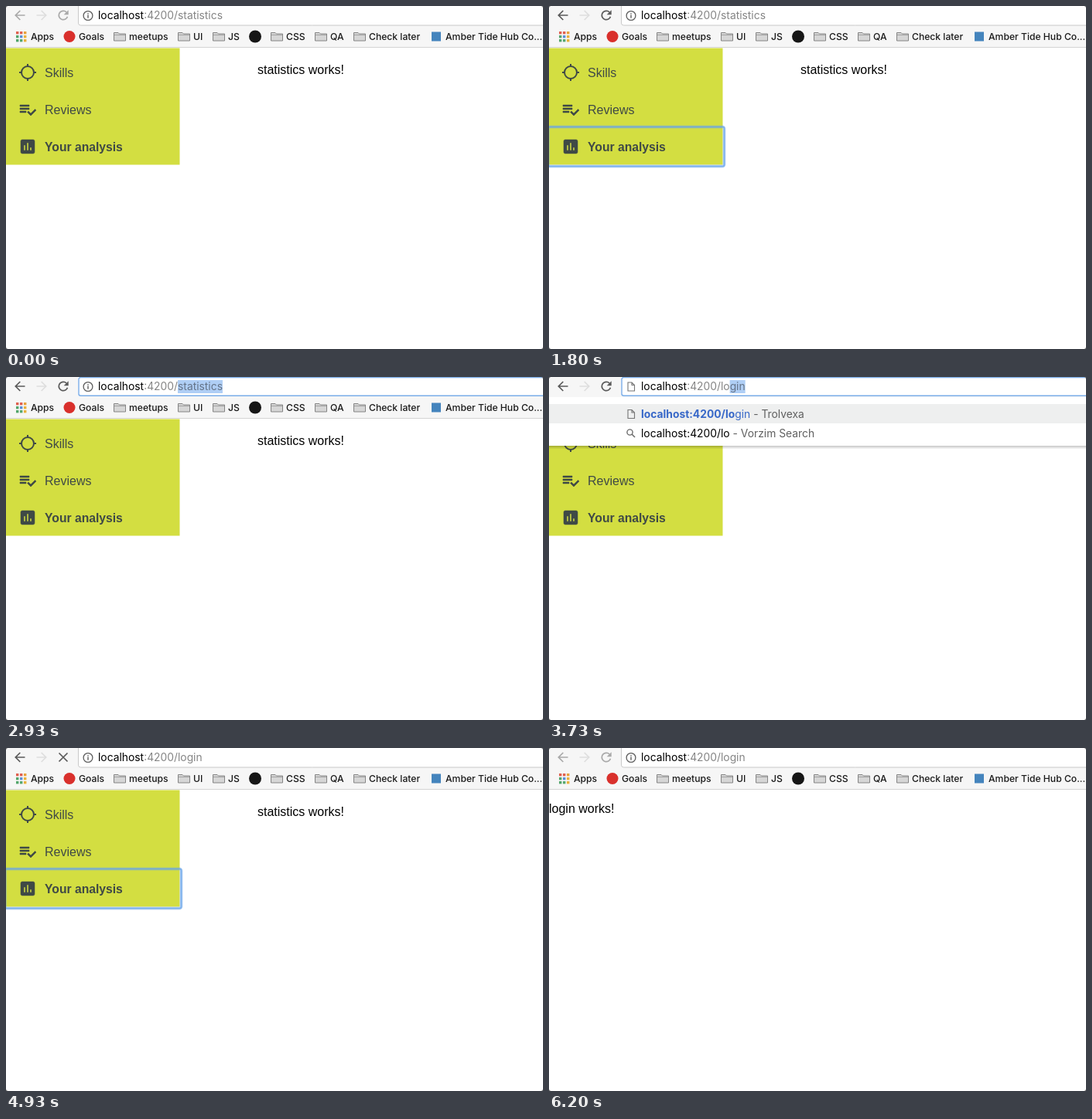
These frames come from a looping animation (694x444 px, 6270 ms). An HTML page with a canvas:

```html
<!DOCTYPE html>
<html lang="en">
<head>
<meta charset="utf-8">
<title>Route guard demo</title>
<style>
  html, body { margin: 0; width: 100%; height: 100%; overflow: hidden; background: #fff; }
  canvas { display: block; width: 694px; height: 444px; }
</style>
</head>
<body>
<canvas id="stage"></canvas>
<script>
const W = 694, H = 444, LOOP = 6270;
const UI = 'Inter, sans-serif', PAGE = '"Liberation Sans", Arial, sans-serif';
const URL_FONT = `13.85px ${UI}`, URL_BOLD = `700 13.85px ${UI}`, MARK_FONT = `500 12.15px ${UI}`;
const HOST = 'localhost', PORT = ':4200/';
const INK = '#3f4946', LIME = '#d3de41', GREY = '#858585';

// Moments of the recorded session, in ms.
const AT = { active: 870, ring: 1470, select: 2800, enter: 4530, loaded: 5070, idle: 6000 };
const KEYS = [[3470, 'l'], [3600, 'lo'], [4000, 'log'], [4130, 'logi'], [4270, 'login']];

const canvas = document.getElementById('stage');
const ctx = canvas.getContext('2d');
const ratio = window.devicePixelRatio || 1;
canvas.width = W * ratio;
canvas.height = H * ratio;

const CHECKLIST = new Path2D('M14 10H2v2h12v-2zm0-4H2v2h12V6zM2 16h8v-2H2v2zm19.5-4.5L23 13l-6.99 7-4.51-4.5L13 14l3.01 3 5.49-5.5z');
const CHART = new Path2D('M19 3H5c-1.1 0-2 .9-2 2v14c0 1.1.9 2 2 2h14c1.1 0 2-.9 2-2V5c0-1.1-.9-2-2-2zM9 17H7v-7h2v7zm4 0h-2V7h2v10zm4 0h-2v-4h2v4z');

function rect(x, y, w, h, color) {
  ctx.fillStyle = color;
  ctx.fillRect(x, y, w, h);
}

function rounded(x, y, w, h, r, color, width) {
  ctx.beginPath();
  ctx.roundRect(x, y, w, h, r);
  if (width) {
    ctx.strokeStyle = color;
    ctx.lineWidth = width;
    ctx.stroke();
  } else {
    ctx.fillStyle = color;
    ctx.fill();
  }
}

function disc(x, y, r, color) {
  ctx.beginPath();
  ctx.arc(x, y, r, 0, 7);
  ctx.fillStyle = color;
  ctx.fill();
}

function ringShape(x, y, r, color, width, from = 0, to = 2 * Math.PI) {
  ctx.beginPath();
  ctx.arc(x, y, r, from, to);
  ctx.strokeStyle = color;
  ctx.lineWidth = width;
  ctx.stroke();
}

function lines(color, width, ...paths) {
  ctx.beginPath();
  for (const path of paths) {
    for (let i = 0; i < path.length; i += 2) {
      ctx[i ? 'lineTo' : 'moveTo'](path[i], path[i + 1]);
    }
  }
  ctx.strokeStyle = color;
  ctx.lineWidth = width;
  ctx.stroke();
}

function icon(path, x, y) {
  ctx.save();
  ctx.translate(x, y);
  ctx.fillStyle = ctx.strokeStyle = INK;
  ctx.lineWidth = 0.5;
  ctx.fill(path);
  ctx.stroke(path);
  ctx.restore();
}

// Draws text and returns the x where it ends.
function text(str, x, y, font, color) {
  ctx.font = font;
  ctx.fillStyle = color;
  ctx.fillText(str, x, y);
  return x + ctx.measureText(str).width;
}

function documentIcon(x, y) {
  lines('#757575', 1.1, [x - 4, y - 5.5, x + 1, y - 5.5, x + 4.5, y - 2, x + 4.5, y + 5.5, x - 4, y + 5.5, x - 4, y - 6],
    [x + 1, y - 5.5, x + 1, y - 2, x + 4.5, y - 2]);
}

function infoIcon(x, y) {
  ringShape(x, y, 5.9, '#5c5c5c', 1.3);
  rect(x - 0.7, y - 1, 1.4, 4.2, '#5c5c5c');
  rect(x - 0.7, y - 3.3, 1.4, 1.4, '#5c5c5c');
}

function arrow(x, y, dir, color) {
  lines(color, 1.7, [x - 6 * dir, y, x + 6.5 * dir, y],
    [x + 0.3 * dir, y - 6, x - 5.7 * dir, y, x + 0.3 * dir, y + 6]);
}

function reloadIcon(x, y, color) {
  ringShape(x, y, 5.7, color, 1.7, 0.3, 5.5);
  ctx.beginPath();
  ctx.moveTo(x + 6.7, y - 6.8);
  ctx.lineTo(x + 6.7, y - 0.8);
  ctx.lineTo(x + 0.7, y - 0.8);
  ctx.fillStyle = color;
  ctx.fill();
}

function folder(x) {
  ctx.beginPath();
  ctx.moveTo(x + 0.5, 45);
  ctx.lineTo(x + 0.5, 34.5);
  ctx.lineTo(x + 6, 34.5);
  ctx.lineTo(x + 7.5, 36);
  ctx.lineTo(x + 15.5, 36);
  ctx.lineTo(x + 15.5, 45);
  ctx.closePath();
  ctx.fillStyle = '#d6d6d6';
  ctx.fill();
  ctx.strokeStyle = '#858585';
  ctx.lineWidth = 1;
  ctx.stroke();
  lines('#a0a0a0', 1, [x + 1, 37.5, x + 15, 37.5]);
}

function drawPage(state) {
  if (state.loggedOut) {
    text('login works!', 0, 84, `16px ${PAGE}`, '#000');
    return;
  }
  rect(0, 54.5, 224.5, 151, LIME);
  ringShape(28, 86, 8, INK, 2);
  lines(INK, 2, [28, 75, 28, 78], [28, 94, 28, 97], [17, 86, 20, 86], [36, 86, 39, 86]);
  icon(CHECKLIST, 16, 122);
  icon(CHART, 16, 170);
  text('Skills', 50, 92, `16px ${PAGE}`, INK);
  text('Reviews', 50, 140, `16px ${PAGE}`, INK);
  text('Your analysis', 50, 188, `bold 15.7px ${PAGE}`, INK);
  text('statistics works!', 325, 88, `16px ${PAGE}`, '#000');
  if (state.ring) {
    rounded(-1, 156.5, 227.5, 51, 2.5, 'rgba(110,168,236,.4)', 4);
    rounded(-1, 156.5, 227.5, 51, 2, 'rgba(100,162,232,.75)', 2);
  }
}

function drawBookmarks() {
  const dots = ['#e0604f', '#e0604f', '#e8a13c', '#52a56b', '#5a8fd6', '#e8b13c', '#52a56b', '#57a86f', '#e8b13c'];
  dots.forEach((color, i) => rect(13 + (i % 3) * 5, 33 + Math.floor(i / 3) * 5, 3.4, 3.4, color));
  disc(82, 39.5, 7.5, '#d9302c');
  disc(322, 39.5, 8, '#161616');
  rect(550, 33.5, 12, 12, '#4484bd');
  const labels = [['Apps', 32], ['Goals', 94], ['Amber Tide Hub Co...', 568]];
  const folders = [['meetups', 139], ['UI', 222], ['JS', 267], ['CSS', 342], ['QA', 399], ['Check later', 449]];
  for (const [label, x] of folders) {
    folder(x);
    labels.push([label, x + 20]);
  }
  for (const [label, x] of labels) text(label, x, 44, MARK_FONT, '#1a1a1a');
}

function drawAddress(state) {
  rounded(93.5, -4, 620, 29, 3, '#fff');
  if (state.focused) rounded(94, 0.5, 620, 23.8, 2.5, '#7aade8', 1.4);
  else rounded(93.5, -4, 620, 29, 3, '#c9c9c9', 1);

  if (state.typed) documentIcon(106, 12.5);
  else infoIcon(106, 12.5);

  ctx.font = URL_FONT;
  const kept = HOST + PORT + state.typed;
  const start = 119 + ctx.measureText(kept).width;
  const rest = state.path.slice(state.typed.length);
  if (state.focused && rest) rect(start, 4, ctx.measureText(rest).width, 17, '#afcef5');
  const x = text(HOST, 119, 17, URL_FONT, '#000');
  text(PORT + state.typed, x, 17, URL_FONT, GREY);
  text(rest, start, 17, URL_FONT, state.focused ? '#647388' : GREY);
}

function drawToolbar(state) {
  rect(0, 0, W, 53, '#f6f6f6');
  rect(0, 53, W, 1, '#d4d4d4');
  const color = state.active ? '#5a5a5a' : '#a9a9a9';
  arrow(18, 12, 1, color);
  arrow(46, 12, -1, '#dedede');
  if (state.loading) lines(color, 1.7, [68.5, 6.5, 79.5, 17.5], [79.5, 6.5, 68.5, 17.5]);
  else reloadIcon(74, 12, color);
  drawBookmarks();
  drawAddress(state);
}

function drawSuggestions(typed) {
  const query = HOST + PORT + typed, blue = '#3868c8';
  for (let i = 0; i < 4; i++) rect(0, 89 + i, W, 1, `rgba(0,0,0,${0.2 - i * 0.05})`);
  rect(0, 26, W, 63, '#fff');
  rect(0, 35, W, 25, '#eeefef');
  documentIcon(106, 48);
  let x = text(query, 119, 53, URL_BOLD, blue);
  x = text('login'.slice(typed.length), x, 53, URL_FONT, blue);
  text(' - Trolvexa', x, 53, URL_FONT, '#606060');
  ringShape(104.5, 71.5, 3.6, '#6b6b6b', 1.4);
  lines('#6b6b6b', 1.6, [107, 74, 111, 78]);
  x = text(query, 119, 78, URL_FONT, '#000');
  text(' - Vorzim Search', x, 78, URL_FONT, '#606060');
}

function drawCorners() {
  for (const x of [0, W]) {
    for (const y of [0, H]) {
      const dx = x ? -2 : 2, dy = y ? -2 : 2;
      ctx.beginPath();
      ctx.moveTo(x, y);
      ctx.lineTo(x + dx, y);
      ctx.lineTo(x, y + dy);
      ctx.fillStyle = '#777';
      ctx.fill();
    }
  }
}

function stateAt(t) {
  const focused = t >= AT.select && t < AT.enter;
  const key = KEYS.filter(([time]) => time <= t).pop();
  return {
    active: t >= AT.active && t < AT.idle,
    focused,
    ring: t >= AT.ring && !focused,
    typed: focused && key ? key[1] : '',
    path: key ? 'login' : 'statistics',
    loading: t >= AT.enter && t < AT.loaded,
    loggedOut: t >= AT.loaded
  };
}

function draw() {
  const state = stateAt(performance.now() % LOOP);
  ctx.setTransform(ratio, 0, 0, ratio, 0, 0);
  rect(0, 0, W, H, '#fff');
  drawPage(state);
  drawToolbar(state);
  if (state.typed) drawSuggestions(state.typed);
  drawCorners();
  requestAnimationFrame(draw);
}

draw();
</script>
</body>
</html>
```
